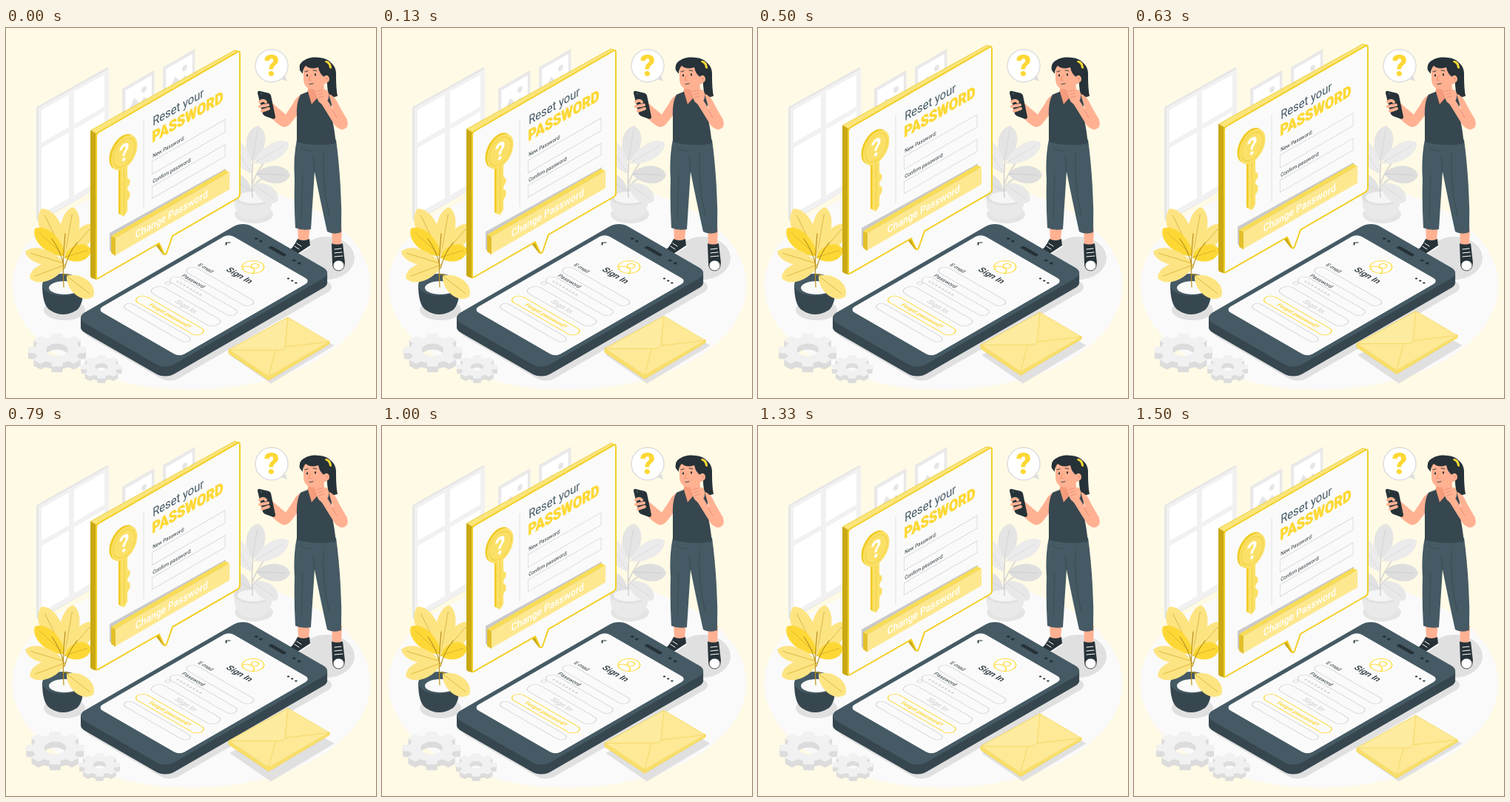
An HTML page that plays this animation: 500x500 px, repeating every 1.54 s.

```html
<!DOCTYPE html>
<html lang="en">
<head>
<meta charset="utf-8">
<title>Reset your password</title>
<style>
  html, body { margin: 0; width: 100%; height: 100%; overflow: hidden; background: #fffae5; }
  svg { display: block; width: 100vw; height: 100vh; font-family: Roboto, sans-serif; }
  .line { fill: none; stroke: #d6d6d6; stroke-width: .9; }
</style>
</head>
<body>
<svg id="stage" viewBox="0 0 500 500"></svg>
<script>
const WALL = 'matrix(.866 -.5 0 1 ';    // isometric upright plane
const FLOOR = 'matrix(.866 .5 -.866 .5 '; // isometric ground plane
const DARK = '#263238', STEEL = '#37474f', SLATE = '#455a64';
const YELLOW = '#fdd835', PALE = '#fde482', SKIN = '#ffb192', SHADOW = '#e0e0e0';

const path = (d, fill, extra = '') => `<path d="${d}" fill="${fill}" ${extra}/>`;
const poly = (points, fill, extra = '') => `<polygon points="${points}" fill="${fill}" ${extra}/>`;
const oval = (x, y, rx, ry, fill, extra = '') =>
  `<ellipse cx="${x}" cy="${y}" rx="${rx}" ry="${ry}" fill="${fill}" ${extra}/>`;
const box = (x, y, w, h, r, extra) =>
  `<rect x="${x}" y="${y}" width="${w}" height="${h}" rx="${r}" ${extra}/>`;
const label = (x, y, size, weight, fill, text, extra = '') =>
  `<text x="${x}" y="${y}" font-size="${size}" font-weight="${weight}" fill="${fill}" ${extra}>${text}</text>`;
const group = (transform, content) => `<g transform="${transform}">${content}</g>`;
const stroke = (d, color, width) =>
  path(d, 'none', `stroke="${color}" stroke-width="${width}" stroke-linecap="round" stroke-linejoin="round"`);
const middle = 'text-anchor="middle"';

// Repeats a shape downwards to give it thickness.
const stack = (shape, height) => {
  let layers = '';
  for (let y = height; y > 0; y--) layers += group(`translate(0 ${y})`, shape);
  return layers;
};

function leaf(x, y, tipX, tipY, width, fill, vein = '#cda52a') {
  const dx = tipX - x, dy = tipY - y, length = Math.hypot(dx, dy);
  const nx = -dy / length * width, ny = dx / length * width;
  const at = (k, side) => `${x + dx * k + nx * side} ${y + dy * k + ny * side}`;
  return path(`M${x} ${y}C${at(.2, .9)} ${at(.85, 1.2)} ${tipX} ${tipY}C${at(.85, -1.2)} ${at(.2, -.9)} ${x} ${y}`, fill)
    + stroke(`M${x} ${y}L${at(.85, 0)}`, vein, .7);
}

function gear(x, y, radius, hole, height) {
  const teeth = 8, points = [];
  for (let i = 0; i < teeth; i++) {
    for (const [offset, scale] of [[-.29, .78], [-.2, 1], [.2, 1], [.29, .78]]) {
      const a = (i + offset) / teeth * 2 * Math.PI;
      points.push(`${radius * scale * Math.cos(a)} ${radius * scale * Math.sin(a)}`);
    }
  }
  const ring = `M${points.join('L')}ZM${hole} 0A${hole} ${hole} 0 1 0 ${-hole} 0A${hole} ${hole} 0 1 0 ${hole} 0Z`;
  const shape = fill => group(`${FLOOR}${x} ${y})`,
    path(ring, fill, `fill-rule="evenodd" stroke="${fill}" stroke-width="2" stroke-linejoin="round"`));
  return stack(shape('#dcdcdc'), height) + shape('#f1f1f1');
}

const picture = (x, y) => group(`${WALL}${x} ${y})`,
  box(0, 0, 50, 62, 0, 'fill="#e9e9e9"') + box(5, 5, 41, 52, 0, 'fill="#fff"')
  + path('M8 50V38L19 22 28 34 34 28 44 40V50Z', '#e6e6e6') + oval(34, 18, 4, 4, '#e6e6e6'));

const room = oval(250.5, 348, 242, 141, '#fafafa')
  + poly('41,107 137,53 139,55 139,207 45,262 41,259', '#e6e6e6')
  + poly('44,108 139,55 139,207 44,261', '#f1f1f1')
  + poly('48,111 85,90 85,134 48,155', '#fff') + poly('92,86 133,63 133,106 92,130', '#fff')
  + poly('48,162 85,141 85,230 48,251', '#fff') + poly('92,137 133,113 133,202 92,226', '#fff')
  + picture(157, 82) + picture(212, 53);

const greyPlant = oval(335, 252, 26, 12, '#e4e4e4')
  + path('M308 228Q308 248 318 255Q334 263 350 255Q360 248 360 228Z', '#e9e9e9')
  + oval(334, 228, 26, 12, '#e0e0e0') + oval(334, 229, 21, 8, '#f5f5f5')
  + stroke('M333 229Q331 190 336 165M333 210Q345 180 365 166M333 215Q345 200 365 197', '#d0d0d0', 1.5)
  + leaf(333, 180, 341, 132, 16, '#e4e4e4', '#cfcfcf')
  + leaf(336, 182, 382, 155, 14, '#ebebeb', '#d4d4d4')
  + leaf(331, 196, 304, 150, 14, '#ebebeb', '#d4d4d4')
  + leaf(338, 197, 384, 199, 15, '#dedede', '#cacaca')
  + leaf(331, 220, 298, 200, 14, '#e2e2e2', '#d0d0d0')
  + leaf(334, 211, 367, 234, 14, '#e8e8e8', '#d0d0d0');

const yellowPlant = oval(79, 381, 28, 14, SHADOW)
  + path('M49 347Q49 374 59 381Q77 393 96 381Q105 373 105 347Z', STEEL)
  + oval(77, 347, 28, 15, SLATE) + oval(79, 351, 21, 9, '#fafafa')
  + leaf(80, 305, 91, 242, 16, PALE) + leaf(78, 306, 48, 244, 18, PALE)
  + leaf(80, 310, 119, 265, 15, PALE) + leaf(79, 308, 39, 271, 15, YELLOW)
  + leaf(79, 310, 115, 299, 14, YELLOW) + leaf(78, 318, 26, 302, 13, PALE)
  + leaf(80, 320, 32, 338, 15, PALE)
  + stroke('M78 350Q76 315 80 278M79 325Q84 305 96 290M78 320Q73 300 62 285M78 333Q84 332 90 338', '#b8901c', 1.2)
  + leaf(82, 335, 118, 363, 16, PALE);

const gears = gear(69, 435, 31, 13, 8) + gear(129, 458, 21.5, 8, 6);

const slab = fill => group(FLOOR + '94 391.5)', box(0, -261, 140, 261, 14, `fill="${fill}"`));
const field = (y, height, color = '#d6d6d6') =>
  box(21, y, 99, height, 7, `fill="none" stroke="${color}" stroke-width="1.1"`);
const phone = group('translate(6 19)', slab(SHADOW)) + stack(slab(STEEL), 13) + slab(SLATE) + group(FLOOR + '94 391.5)',
  box(6, -233, 128, 205, 8, 'fill="#fafafa"')
  + box(55, -250, 25, 5, 2.5, `fill="${DARK}"`)
  + [34, 41, 93, 101].map(x => oval(x, -248, 2, 2, DARK)).join('')
  + stroke('M19 -222L16 -219 19 -216', DARK, 1.5)
  + [113, 119, 125].map(x => oval(x, -219, 1.4, 1.4, DARK)).join('')
  + oval(70, -207, 12, 12, '#fff', `stroke="${YELLOW}" stroke-width="1.2"`)
  + oval(70, -210, 4.2, 4.2, 'none', `stroke="${YELLOW}" stroke-width="1.2"`)
  + stroke('M62 -199Q63 -205 70 -205Q77 -205 78 -199', YELLOW, 1.2)
  + label(71, -181, 12, 500, DARK, 'Sign In', middle)
  + label(24, -166, 7.7, 400, DARK, 'E-mail') + field(-162, 14)
  + label(26, -139, 7.5, 400, DARK, 'Password') + field(-136, 14)
  + label(29, -124, 9, 400, '#c4c4c4', '********', 'letter-spacing="1.2"')
  + box(23, -121, 5, 5, 1, 'class="line"')
  + field(-110, 17) + label(71, -98, 10, 500, '#d2d2d2', 'Sign In', middle)
  + field(-84, 15, YELLOW) + label(71, -74, 7.8, 700, YELLOW, 'Forgot password?', middle)
  + field(-63, 12));

const outline = color => `stroke="${color}" stroke-width=".8" stroke-linejoin="round"`;
const envelopeShadow = poly('303,442 384,396 443,429 358,480', SHADOW, outline(SHADOW));
const envelope = poly('301,435 355,470 437,423 437,427 355,476 301,440', '#f9df6b', outline('#f3d350'))
  + poly('301,435 381,391 437,424 355,471', '#fde996', outline('#f5da62'))
  + stroke('M355 470L364 436M376 431L437 424', '#f3d55a', .8)
  + path('M301 435L381 391 377 431Q375 435 369 435Z', '#fdeb9f', outline('#f3d55a'));

const keyShape = fill => oval(43, -150, 20.5, 21.5, fill)
  + path('M37 -135H48V-113L52 -109V-104L48 -100V-97L52 -92V-86L48 -82V-69L43 -64 37 -69Z', fill);
const panel = poly('115,138 309,30 316,32 122,143', '#fbe57b', outline('#e9c829'))
  + path('M114 138L122 143V340L116 338Q114 337 114 335Z', '#c9a813')
  + path('M202 293L212 306 216 307 210 291Z', '#c9a813')
  + path('M122 146Q122 143 125 141L312 33Q316 30 316 35V225Q316 228 313 230L225 281 217 304Q215 308 213 304L207 291 125 338Q122 340 122 337Z',
    '#fafafa', 'stroke="#f2cf26" stroke-width="2"')
  + group(WALL + '120 338.5)', keyShape('#f0cb25'))
  + group(WALL + '122.5 340)',
    keyShape('#fbe067')
    + oval(43, -150, 17, 17.5, 'none', 'stroke="#f0cf3e" stroke-width="1"')
    + stroke('M43 -128V-68', '#f0cf3e', 1)
    + label(43, -139, 32, 700, '#fff', '?', middle))
  + group(WALL + '122 340)',
    stroke('M74 -178V-60', '#d9d9d9', .9)
    + label(88, -163.5, 17, 400, SLATE, 'Reset your')
    + label(87, -141.5, 20.8, 900, YELLOW, 'PASSWORD', `stroke="${YELLOW}" stroke-width=".5"`)
    + label(88, -120.5, 7.2, 400, DARK, 'New Password:') + box(87, -116, 114, 17, 0, 'class="line"')
    + label(88, -86, 7.2, 400, DARK, 'Confirm password:') + box(87, -82, 114, 16, 0, 'class="line"'))
  + poly('140,277 297,190 297,199 142,302 140,301', '#c9c9c9')
  + poly('142,281 148,284 148,308 142,304', '#e3c02c')
  + poly('142,281 296,192 302,195 148,284', '#f8dc55')
  + group(WALL + '122 340)', box(30, -41, 178, 23, 0, 'fill="#fde88f"')
    + label(61, -25, 14, 500, '#fff', 'Change Password'));

const question = path('M371 69L380 72 376 61Z', '#dedede') + oval(359, 51, 22, 22, '#fff', 'stroke="#dedede" stroke-width="1.5"')
  + label(359, 65, 40, 800, YELLOW, '?', middle);

const shoes = path('M394 285Q402 289 410 285L411 294 396 304Q388 310 379 306L378 303Q388 299 394 285', DARK)
  + stroke('M379 306Q388 310 397 304L411 295', '#fff', 1.5) + stroke('M390 295L396 299M393 291L399 295', '#fff', 1)
  + path('M440 291Q447 294 455 291L458 317Q457 328 449 328Q441 328 441 317Z', DARK)
  + oval(449.5, 321, 7.5, 7, '#fff', `stroke="${DARK}" stroke-width=".8"`)
  + stroke('M444 299L453 298M444 304L454 303M444 309L455 308', '#fff', 1.1);

const woman = oval(433, 311, 38, 29, SHADOW)
  + path('M394 265H411L409 287Q402 291 395 287Z', SKIN) + path('M440 270H454L453 292Q447 295 441 292Z', SKIN)
  + shoes
  + path('M393 151H446Q450 180 452 215Q454 245 453 276Q443 280 434 275Q424 230 417 194L412 272Q400 274 391 270Q389 235 390 205Q388 175 393 151', SLATE)
  + stroke('M417 194L415 174M398 161Q404 166 412 166M429 168Q427 215 437 252M401 200L399 256', STEEL, .8)
  // ponytail and neck
  + path('M430 44Q447 46 446 65Q446 82 448 92Q442 93 438 97Q433 85 434 62Z', DARK)
  + path('M410 74H429L430 89 413 104 407 88Z', '#f59c7c')
  // arm with the phone
  + path('M399 90Q391 94 388 102L378 117 357 99 349 108Q360 126 371 132Q379 137 386 127L398 112Z', SKIN)
  + path('M408 86L413 103 429 85Q437 88 440 98L440 118Q444 138 446 156Q420 161 393 154L393 120Q392 100 398 90Z', STEEL)
  // arm raised to the chin
  + path('M436 89Q445 92 449 103L461 124Q464 135 456 137Q450 138 444 131L426 102 432 94 442 110Z', SKIN)
  + stroke('M441 111L447 121', '#e8876a', .8)
  // head
  + path('M402 52Q412 44 428 51L436 66Q436 74 430 76Q426 84 414 83Q403 82 402 69Z', SKIN)
  + path('M397 57Q395 47 404 43Q412 38 424 40Q441 42 443 56L437 77Q432 75 430 66Q424 63 422 53Q412 57 405 51Q401 55 401 62Z', DARK)
  + path('M432 44Q440 45 440 55L437 54Q437 48 431 46Z', YELLOW)
  + oval(433, 69, 4, 5, SKIN) + stroke('M432 68Q435 67 435 71', '#e8876a', .8)
  + oval(407, 64, 1.1, 1.7, DARK) + oval(418, 63, 1.1, 1.7, DARK)
  + stroke('M404 59L408 58M415 57L420 58M410 76L415 75', DARK, .9)
  + stroke('M412 64L409 70 412 71', '#e8876a', .9)
  + path('M418 86Q416 84 419 82L429 79Q431 80 428 82L434 84Q438 90 435 97L428 104Q420 99 420 92Z', SKIN)
  + stroke('M420 86L427 84M422 90L428 88M423 94L429 92', '#e8876a', .8)
  // phone and fingers
  + path('M349 97Q358 97 361 104L355 115Q346 113 344 108Z', SKIN)
  + path('M342 85L355 88Q357 89 358 91L364 120Q364 123 361 123L350 119Q348 118 347 116L340 88Q340 85 342 85', DARK)
  + stroke('M343 100Q348 96 351 100M343 106L354 104M346 112L355 109', SKIN, 4)
  + oval(345, 89, 1.2, 1.2, SLATE);

document.getElementById('stage').innerHTML = room + greyPlant + yellowPlant
  + `<g id="gears">${gears}</g>` + woman + question + phone + envelopeShadow
  + `<g class="float">${envelope}</g><g class="float">${panel}</g>`;

const floats = document.querySelectorAll('.float');
const gearPair = document.getElementById('gears');

function frame() {
  const progress = Math.min((performance.now() % 1540) / 1500, 1);
  const lift = 1 - Math.abs(1 - 2 * progress);
  for (const part of floats) part.setAttribute('transform', `translate(0 ${-10 * lift})`);
  gearPair.setAttribute('transform', `translate(${-2.8 * lift} 0)`);
  requestAnimationFrame(frame);
}
frame();
</script>
</body>
</html>
```
